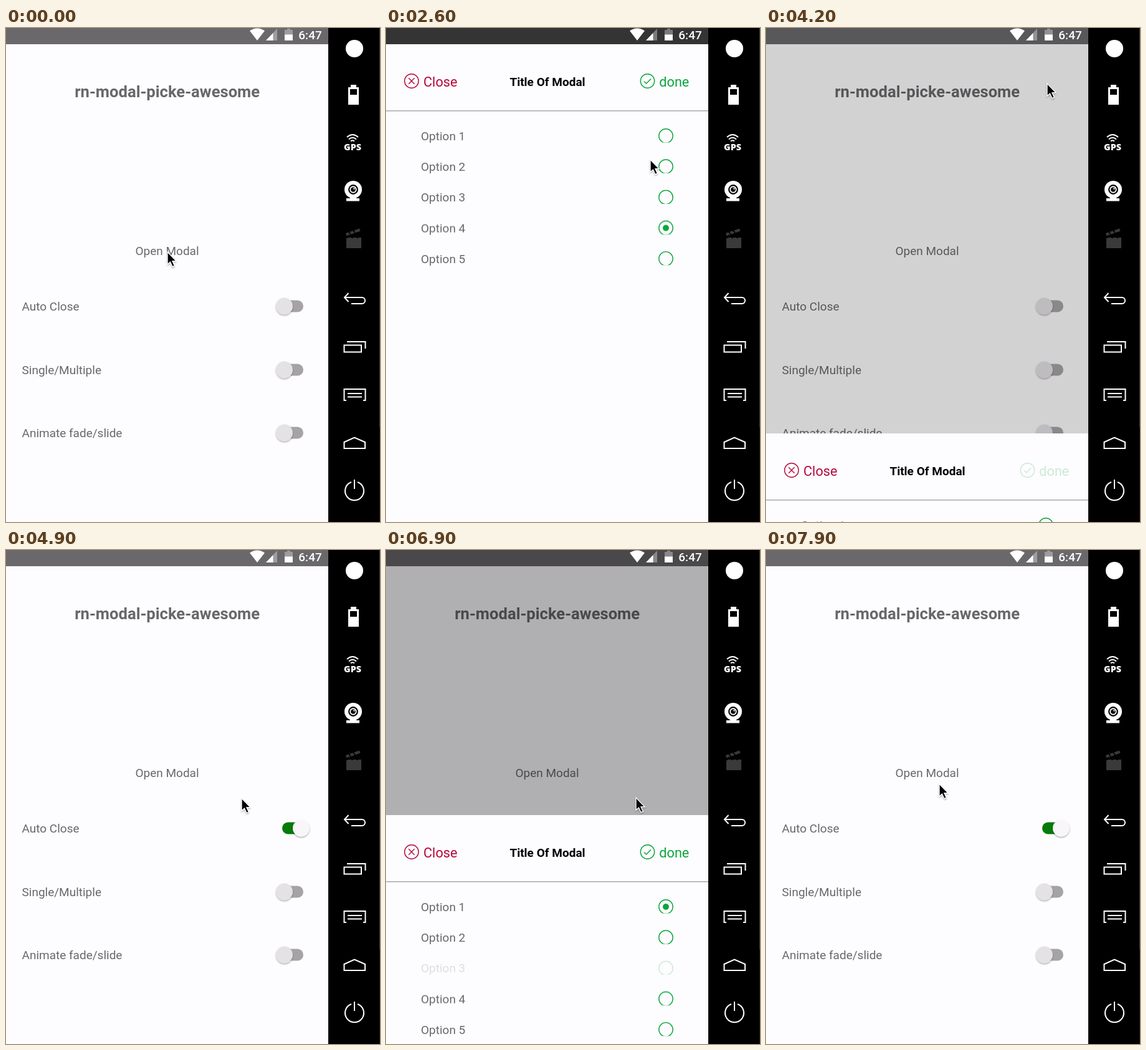
Recreate the animation shown at these times as an HTML page. Size 600x792 px, loop 8000 ms.

```html
<!DOCTYPE html>
<html lang="en">
<head>
<meta charset="utf-8">
<title>Modal picker demo</title>
<style>
  html, body { margin: 0; width: 100%; height: 100%; overflow: hidden; background: #000; }
  svg { display: block; width: 100vw; height: 100vh; }
  text { font: 19px Roboto, sans-serif; fill: #69676a; }
  .mid { text-anchor: middle; }
  .bold { font-weight: 700; }
  .heading { font-size: 25.6px; }
  .action { font-size: 21.7px; }
  .line { fill: none; stroke: #fff; stroke-width: 2; }
  .red { stroke: #b5093a; }
  .green { stroke: #0ba53d; }
  .thin { fill: none; stroke-width: 1.4; }
  .dot { fill: #0ba53d; }

  /* One step is 100 ms, or 1.25% of the loop. */
  .anim { animation: 8s step-end -10ms infinite; }
  #cursor { animation-name: cursor; }
  #modal { animation-name: slide; }
  #dim { animation-name: dim; }
  #open { animation-name: press-open; }
  #done { animation-name: press-done; }
  #row1 { animation-name: press-1; }
  #row3 { animation-name: press-3; }
  #row4 { animation-name: press-4; }
  #dot1 { animation-name: pick-1; }
  #dot4 { animation-name: pick-4; }
  #thumb { animation-name: thumb; }
  #track { animation-name: track; }

  @keyframes cursor {
    0% { transform: translate(258px, 358px); }
    5% { transform: translate(258px, 358px); animation-timing-function: steps(7); }
    13.75% { transform: translate(416px, 214px); }
    18.75% { transform: translate(416px, 214px); animation-timing-function: steps(4); }
    23.75% { transform: translate(446px, 314px); }
    28.75% { transform: translate(446px, 314px); animation-timing-function: steps(3); }
    32.5% { transform: translate(423px, 210px); animation-timing-function: steps(3); }
    36.25% { transform: translate(442px, 170px); }
    41.25% { transform: translate(442px, 170px); animation-timing-function: steps(4); }
    46.25% { transform: translate(450px, 88px); }
    53.75% { transform: translate(450px, 88px); animation-timing-function: steps(3); }
    57.5% { transform: translate(458px, 438px); }
    60% { transform: translate(458px, 438px); animation-timing-function: steps(2); }
    62.5% { transform: translate(296px, 356px); }
    65% { transform: translate(296px, 356px); animation-timing-function: steps(5); }
    71.25% { transform: translate(459px, 406px); }
    72.5% { transform: translate(459px, 406px); animation-timing-function: steps(5); }
    78.75% { transform: translate(432px, 266px); }
    83.75% { transform: translate(432px, 266px); animation-timing-function: steps(2); }
    86.25% { transform: translate(400px, 396px); animation-timing-function: steps(7); }
    95%, 100% { transform: translate(277px, 374px); }
  }
  @keyframes slide {
    0%, 53.75%, 88.75%, 100% { transform: translateY(766px); }
    5% { transform: translateY(388px); }
    6.25% { transform: translateY(110px); }
    7.5% { transform: translateY(12px); }
    8.75%, 66.25% { transform: none; }
    51.25% { transform: translateY(230px); }
    52.5% { transform: translateY(624px); }
    63.75% { transform: translateY(300px); }
    65% { transform: translateY(70px); }
    85% { transform: translateY(110px); }
    86.25% { transform: translateY(399px); }
    87.5% { transform: translateY(730px); }
  }
  @keyframes dim {
    0%, 53.75%, 88.75%, 100% { opacity: 0; }
    5% { opacity: .25; }
    6.25%, 65% { opacity: .43; }
    7.5%, 66.25% { opacity: .5; }
    51.25% { opacity: .36; }
    52.5% { opacity: .17; }
    63.75% { opacity: .3; }
    85% { opacity: .44; }
    86.25% { opacity: .305; }
    87.5% { opacity: .08; }
  }
  @keyframes press-open {
    0%, 6.25%, 65%, 100% { opacity: 1; }
    1.25%, 62.5% { opacity: .5; }
    2.5%, 63.75% { opacity: .2; }
    5% { opacity: .5; }
  }
  @keyframes press-done {
    0%, 53.75%, 100% { opacity: 1; }
    48.75% { opacity: .5; }
    50% { opacity: .2; }
  }
  @keyframes press-1 { 0%, 40%, 100% { opacity: 1; } 37.5% { opacity: .2; } 38.75% { opacity: .6; } }
  @keyframes press-3 { 0%, 88.75%, 100% { opacity: 1; } 83.75% { opacity: .5; } 85% { opacity: .2; } }
  @keyframes press-4 { 0%, 27.5%, 100% { opacity: 1; } 25% { opacity: .2; } 26.25% { opacity: .6; } }
  @keyframes pick-1 { 0% { opacity: 0; } 38.75%, 100% { opacity: 1; } }
  @keyframes pick-4 { 0%, 38.75%, 100% { opacity: 0; } 26.25% { opacity: 1; } }
  @keyframes thumb {
    0% { transform: none; fill: #e4e2e4; }
    58.75%, 100% { transform: translateX(27px); fill: #f8f6f8; }
  }
  @keyframes track { 0% { fill: #a5a3a6; } 58.75%, 100% { fill: #047a08; } }
</style>
</head>
<body>
<svg viewBox="0 0 600 792">
  <defs>
    <filter id="shadow" x="-50%" y="-50%" width="200%" height="200%">
      <feDropShadow dx="0" dy="1.5" stdDeviation="1.2" flood-opacity=".35"/>
    </filter>
    <clipPath id="cut"><rect x="430" y="155" width="40" height="28.5"/></clipPath>
    <rect id="groove" x="443" y="-9.5" width="34" height="19" rx="9.5"/>
    <circle id="knob" cx="446.5" r="13.5" filter="url(#shadow)"/>
    <g id="off">
      <use href="#groove" fill="#a5a3a6"/>
      <use href="#knob" fill="#e4e2e4"/>
    </g>
    <g id="radio" clip-path="url(#cut)">
      <circle class="thin green" cx="449" cy="173" r="11.2"/>
    </g>
    <circle id="dot" class="dot" cx="449" cy="173" r="5"/>
  </defs>

  <!-- Main screen -->
  <rect width="517" height="792" fill="#fdfcfe"/>
  <rect width="517" height="26" fill="#6a686b"/>
  <text class="mid bold heading" x="258.7" y="111">rn-modal-picke-awesome</text>
  <text id="open" class="anim mid" x="258.5" y="364">Open Modal</text>
  <text x="25.5" y="453">Auto Close</text>
  <text x="25.5" y="555">Single/Multiple</text>
  <text x="25.5" y="656">Animate fade/slide</text>
  <g transform="translate(0 446)">
    <use id="track" class="anim" href="#groove"/>
    <use id="thumb" class="anim" href="#knob"/>
  </g>
  <use href="#off" y="548"/>
  <use href="#off" y="649"/>
  <rect id="dim" class="anim" width="517" height="792"/>

  <!-- Modal -->
  <g id="modal" class="anim">
    <rect y="26" width="517" height="780" fill="#fdfcfe"/>
    <path d="M0 132.7H517" stroke="#aaa8ac" stroke-width="1.4"/>
    <g class="thin red">
      <circle cx="41" cy="85" r="11.2"/>
      <path d="M36.3 80.3L45.7 89.7M45.7 80.3L36.3 89.7"/>
    </g>
    <text class="action" x="60" y="93.7" style="fill:#b5093a">Close</text>
    <text class="mid bold" x="259" y="93" style="fill:#000">Title Of Modal</text>
    <g id="done" class="anim">
      <g class="thin green">
        <circle cx="419.5" cy="85" r="11.2"/>
        <path d="M414 85.5L417.7 89L425 81.5"/>
      </g>
      <text class="action" x="438.3" y="93.7" style="fill:#0ba53d">done</text>
    </g>
    <g id="row1" class="anim">
      <text x="56" y="180">Option 1</text>
      <use href="#radio"/>
      <use id="dot1" class="anim" href="#dot"/>
    </g>
    <g transform="translate(0 49.2)">
      <text x="56" y="180">Option 2</text>
      <use href="#radio"/>
    </g>
    <g transform="translate(0 98.4)"><g id="row3" class="anim">
      <text x="56" y="180">Option 3</text>
      <use href="#radio"/>
    </g></g>
    <g transform="translate(0 147.6)"><g id="row4" class="anim">
      <text x="56" y="180">Option 4</text>
      <use href="#radio"/>
      <use id="dot4" class="anim" href="#dot"/>
    </g></g>
    <g transform="translate(0 196.8)">
      <text x="56" y="180">Option 5</text>
      <use href="#radio"/>
    </g>
  </g>

  <!-- Status icons -->
  <g fill="#fff">
    <path d="M391 4.5Q403 -3.5 415 4.5L403 20Z"/>
    <path d="M417 20H435V1Z" opacity=".35"/>
    <path d="M417 20H428.5V8Z"/>
    <path d="M447 3H451V1H456V3H460V11H447Z" opacity=".35"/>
    <path d="M447 10.5H460V20H447Z"/>
    <text x="469.3" y="18" style="fill:#fff;font-weight:500">6:47</text>
  </g>

  <!-- Emulator toolbar -->
  <rect x="517" width="83" height="792"/>
  <path d="M599.5 0V640" stroke="#4a4241"/>
  <path d="M599.5 640V792" stroke="#221a19"/>
  <circle cx="559" cy="33" r="14" fill="#fff"/>
  <path d="M549 95H553V91H562V95H566V123H549ZM552 98V107H563V98Z" fill="#fff" fill-rule="evenodd"/>
  <path class="line" d="M547 175Q556 167 565 175M550 178.5Q556 173 562 178.5M553 181.5Q556 179 559 181.5"/>
  <text class="mid" x="556" y="195.5" style="font:800 14.3px 'Open Sans',sans-serif;fill:#fff">GPS</text>
  <g fill="#fff">
    <circle cx="557" cy="259" r="14"/>
    <path d="M552 271H562V273H567V277.5H546V273H552Z"/>
    <circle cx="557" cy="259" r="6.8" stroke="#000" stroke-width="2.2"/>
    <circle cx="557" cy="259" r="3.8" fill="#000"/>
    <circle cx="558.5" cy="257.5" r="1.2"/>
  </g>
  <g fill="#3a3a3a">
    <path d="M546 336H570V353H546Z"/>
    <path d="M545 329L567 321.5L568.5 325.5L546.5 333.5Z"/>
    <path d="M550 327L553 331M557 324.5L560 328.5M550 332L547 337M558 332L555 337M566 332L563 337" stroke="#000" stroke-width="2"/>
  </g>
  <g class="line">
    <path d="M549.5 425L543 432L549.5 439M543 432H571A5 5 0 0 1 571 442H554"/>
    <path d="M542.5 508.5H570V519.5H542.5ZM547 503H576.5V514"/>
    <path d="M546 597H542.5V579H576.5V597H573M548 586H571M548 591.5H571"/>
    <path d="M542.5 674V664L559 656.5L576 664V674Z"/>
    <path d="M554 728A15 15 0 1 0 564 728M559 724V739"/>
  </g>

  <g id="cursor" class="anim">
    <path d="M1 1V21L5.5 17L9 24.7L12.4 23.2L9 15.6H15Z" fill="#000" stroke="#fff" stroke-width="1.3" filter="url(#shadow)"/>
  </g>
</svg>
</body>
</html>
```
